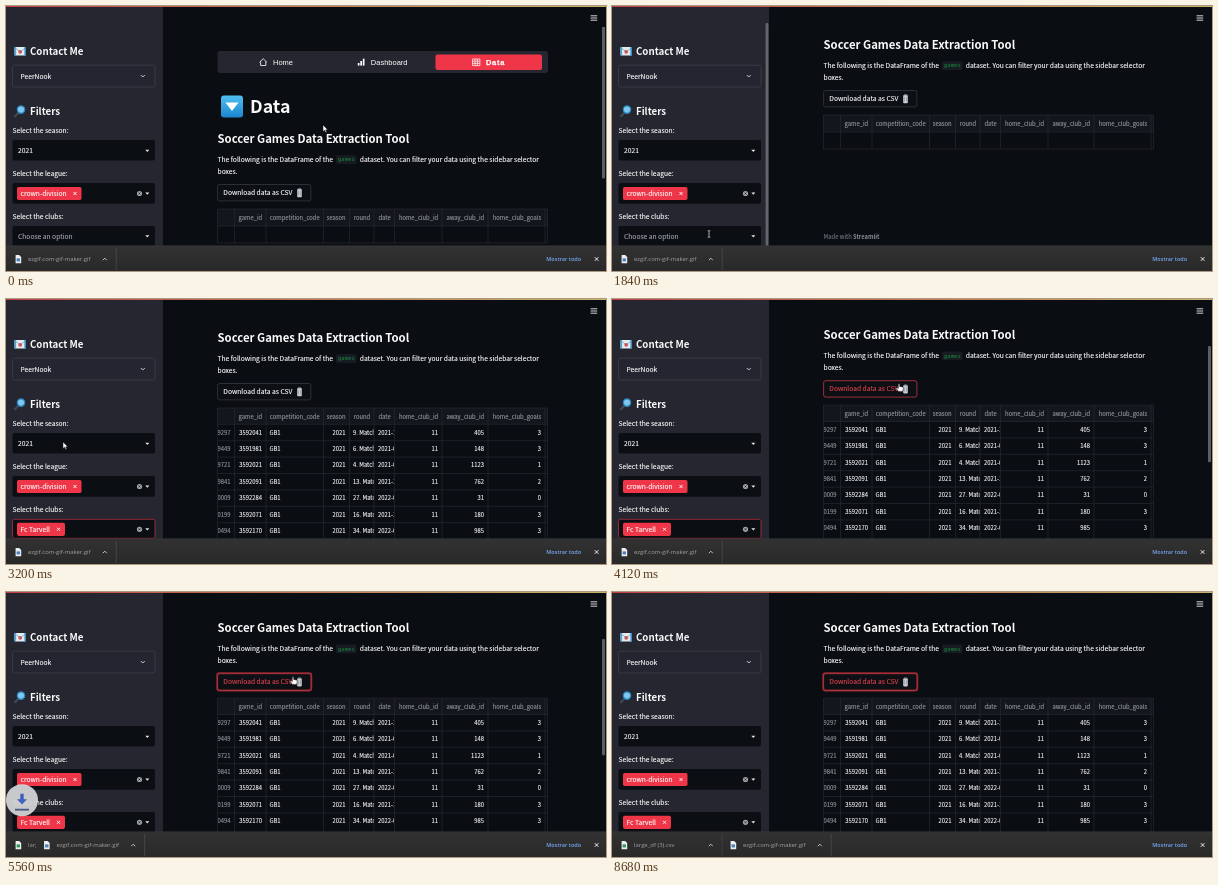
Recreate the animation shown at these times as an HTML page. Size 600 by 265 pixels, loop 8720 ms.

```html
<!DOCTYPE html>
<html lang="en">
<head>
<meta charset="utf-8">
<title>Data extraction dashboard</title>
<style>
  html, body { margin: 0; width: 100%; height: 100%; overflow: hidden; background: #0a0d12; }
  svg { display: block; width: 600px; height: 265px; }
  text { white-space: pre; }
  .sans { font-family: "Noto Sans CJK JP", "Noto Sans CJK SC", "Noto Sans CJK", "Open Sans", sans-serif; }
  .ui { font-family: "Open Sans", "Noto Sans", sans-serif; }
  .nav { font-family: "Liberation Sans", Arial, sans-serif; }
  .mono { font-family: "Noto Sans Mono", "DejaVu Sans Mono", monospace; }
  #button { --ink: #fafafa; --edge: #3b3e44; --ring: none; }
  #button.hover { --ink: #d8404b; --edge: #d8404b; }
  #button.focus { --ring: rgba(225, 50, 65, .65); }
  #button text { fill: var(--ink); stroke: var(--ink); }
  #edge { fill: #0c0f14; stroke: var(--edge); stroke-width: .7; }
  #ring { fill: none; stroke: var(--ring); stroke-width: 1.5; }
</style>
</head>
<body>
<svg id="stage" viewBox="0 0 600 265" xmlns="http://www.w3.org/2000/svg"></svg>
<script>
const LOOP = 8720;
const RED = '#ef3648', DARK = '#0b0e13', PANEL = '#252630', GRID = '#262930';

// ---- drawing helpers ----
const rect = (x, y, w, h, fill, extra = '') =>
  `<rect x="${x}" y="${y}" width="${w}" height="${h}" fill="${fill}" ${extra}/>`;
const path = (d, stroke, width = .8, extra = '') =>
  `<path d="${d}" fill="none" stroke="${stroke}" stroke-width="${width}" ${extra}/>`;
const shape = (d, fill, extra = '') => `<path d="${d}" fill="${fill}" ${extra}/>`;
const group = (id, body, extra = '') => `<g id="${id}" ${extra}>${body}</g>`;
const label = (cls, x, y, str, size, fill, extra = '') =>
  `<text class="${cls}" x="${x}" y="${y}" font-size="${size}" fill="${fill}" ${extra}>${str}</text>`;

// y is the middle of the capitals; the CJK face draws its Latin larger than nominal
const text = (x, y, str, size = 7.48, fill = '#fafafa', extra = '') =>
  label('sans', x, (y + size * .33).toFixed(2), str, (size / 1.117).toFixed(2), fill,
    `stroke="${fill}" stroke-width=".14" ${extra}`);
const bold = (x, y, str, size) =>
  label('sans', x, (y + size * .33).toFixed(2), str, (size / 1.155).toFixed(2), '#fafafa', 'font-weight="700"');
const END = 'text-anchor="end"';

const cross = (x, y, r, color, w = .9) =>
  path(`M${x - r} ${y - r}l${2 * r} ${2 * r}m0 ${-2 * r}l${-2 * r} ${2 * r}`, color, w);
const caret = (x, y) => shape(`M${x - 2} ${y - 1}h4l-2 2.2z`, '#e8e8ea');
const chevron = (x, y, up) =>
  path(`M${x - 2} ${y + (up ? 1 : -1)}l2 ${up ? -2 : 2}l2 ${up ? 2 : -2}`, '#d5d5d8', .9);
const clear = y => `<circle cx="133.5" cy="${y}" r="2.6" fill="#a0a2a8"/>` + cross(133.5, y, .9, DARK, .7);
const box = (y, h, stroke = 'none') =>
  rect(6.5, y, 142.5, h, DARK, `rx="2" stroke="${stroke}" stroke-width=".8"`);
const tag = (y, w, str) =>
  rect(11, y - 6.6, w, 13.2, RED, 'rx="1.8"') + text(14.5, y, str) + cross(11 + w - 6.5, y, 1.5, '#fff');

// ---- main column ----
const cols = [228.5, 260, 317.5, 343.5, 368, 388.5, 436, 482, 539];
const heads = ['game_id', 'competition_code', 'season', 'round', 'date',
  'home_club_id', 'away_club_id', 'home_club_goals'];
const games = [
  ['19297', 3592041, 2021, '9. Matchday', '2021-10', 405, 3],
  ['19449', 3591981, 2021, '6. Matchday', '2021-09', 148, 3],
  ['19721', 3592021, 2021, '4. Matchday', '2021-09', 1123, 1],
  ['19841', 3592091, 2021, '13. Matchday', '2021-11', 762, 2],
  ['20009', 3592284, 2021, '27. Matchday', '2022-03', 31, 0],
  ['20199', 3592071, 2021, '16. Matchday', '2021-12', 180, 3],
  ['20494', 3592170, 2021, '34. Matchday', '2022-04', 985, 3]
];
const CELL = 6.54;

function grid(top, rows, bottom) {
  const lines = cols.map(x => `M${x} ${top}V${bottom}`).join('') +
    rows.map(y => `M211.5 ${y}H541.5`).join('');
  return rect(211.5, top, 330, rows[0] - top, '#13161c') +
    path(`M211.5 ${top}H541.5V${bottom}H211.5z` + lines, GRID, .7);
}
const headRow = y => heads.map((h, i) =>
  text(cols[i + 1] - 3.8, y, h, CELL, '#8f929a', END)).join('');

function gameRow([index, id, season, round, date, away, goals], i) {
  const y = 227.5 + i * 16.4, ink = '#f0f1f3';
  const right = (c, v) => text(cols[c] - 4, y, v, CELL, ink, END);
  return `<g clip-path="url(#cIndex)">${text(224.5, y, index, CELL, '#8f929a', END)}</g>` +
    right(1, id) + text(263.5, y, 'GB1', CELL, ink) + right(3, season) +
    `<g clip-path="url(#cRound)">${text(347, y, round, CELL, ink)}</g>` +
    `<g clip-path="url(#cDate)">${text(372, y, date, CELL, ink)}</g>` +
    right(6, 11) + right(7, away) + right(8, goals);
}

const emptyTable = grid(203, [220], 237) + headRow(211.5) +
  text(211.5, 324.5, 'Made with', CELL, '#6c6f76') +
  label('sans', 241, 326.7, 'Streamlit', 5.75, '#8d9096', 'font-weight="700"');
const fullTable = grid(203, games.map((_, i) => 219.3 + i * 16.4), 345) +
  headRow(211.5) + games.map(gameRow).join('');

const navBar = rect(211.5, 45, 330.5, 22, PANEL, 'rx="3"') +
  rect(429.5, 48.5, 106.5, 15.5, RED, 'rx="2"') +
  path('M253.5 56.3l3.7-3.6l3.7 3.6M254.6 55.5v4h5.2v-4', '#fff', .8) +
  rect(351.8, 57, 1.7, 2.6, '#fff') + rect(354.3, 55, 1.7, 4.6, '#fff') + rect(356.8, 52.7, 1.7, 6.9, '#fff') +
  path('M466.5 53h7.4v6.6h-7.4zM466.5 55.2h7.4M466.5 57.4h7.4M469 53v6.6M471.4 53v6.6', '#fff', .7) +
  label('nav', 267, 58.8, 'Home', 7.5, '#fff') +
  label('nav', 364.8, 58.8, 'Dashboard', 7.5, '#fff') +
  label('nav', 480, 58.8, 'Data', 7.5, '#fff', 'font-weight="700" letter-spacing=".7" stroke="#fff" stroke-width=".25"');

const button = rect(211, 177.9, 94.5, 17.6, 'none', 'id="ring" rx="2.4"') +
  rect(211.6, 178.5, 93.3, 16.4, 'none', 'id="edge" rx="2"') +
  text(217.3, 186.8, 'Download data as CSV') +
  rect(291.2, 183, 4.6, 8.2, '#c9ccd2', 'rx=".8"') + rect(292.2, 182.2, 2.6, 1.3, '#888c95') +
  path('M292.5 185v4.4M294.5 185v4.4', '#81858e', .5);

const main = navBar +
  rect(215, 89.5, 22, 22, 'url(#blue)', 'rx="3"') + shape('M219.5 96.5h13l-6.5 8.6z', '#fff') +
  bold(244, 100.5, 'Data', 20.55) +
  bold(211.5, 132.4, 'Soccer Games Data Extraction Tool', 13.1) +
  text(211.5, 153.3, 'The following is the DataFrame of the') +
  rect(330, 149.3, 20.5, 8.8, '#171c22', 'rx="1.5"') +
  label('mono', 332, 155.4, 'games', 5.6, '#178a3f') +
  text(353.8, 153.3, 'dataset. You can filter your data using the sidebar selector') +
  text(211.5, 165.3, 'boxes.') +
  group('button', button) + group('empty', emptyTable) + group('full', fullTable);

const header = rect(157, 0, 443, 21, '#0a0d12') +
  group('running', text(518, 12, 'RUNNING...', 5.6, '#a5a8ae') +
    rect(553, 7, 17.5, 10, 'none', 'rx="2" stroke="#3b3e44" stroke-width=".7"') + text(556, 12, 'Stop', 5.6)) +
  path('M584.6 9.8h6.6M584.6 12h6.6M584.6 14.2h6.6', '#e8e8ea', .9);

// ---- sidebar ----
const mailIcon = rect(8.5, 41, 11.5, 8.6, '#e3ebf0', 'rx="1"') +
  path('M8.8 41.5l5.5 4.4l5.5-4.4', '#7fb2cf', .9) +
  rect(8.5, 41, 1.6, 8.6, '#4fa3d0') + rect(18.4, 41, 1.6, 8.6, '#3a8fc6') +
  '<circle cx="14.2" cy="45.8" r="1.9" fill="#c8575c"/>';
const lensIcon = path('M12.6 106.4l-3.6 3.8', '#3c4b58', 2.2, 'stroke-linecap="round"') +
  '<circle cx="15" cy="103.6" r="3.7" fill="#7cc8f0" stroke="#2c86bd" stroke-width="1.3"/>';

const sidebar = rect(0, 0, 157, 240, PANEL) +
  group('sideBar', rect(153.6, 17, 2.8, 223, '#65666d', 'rx="1.2"')) +
  mailIcon + bold(24, 45, 'Contact Me', 11.2) +
  rect(6.5, 59.2, 142.5, 21.8, '#242530', 'rx="2" stroke="#41434d" stroke-width=".7"') +
  text(14.5, 70.2, 'PeerNook') + chevron(136.8, 70) +
  lensIcon + bold(24, 105, 'Filters', 11.2) +
  text(6.5, 125, 'Select the season:') + box(134, 20.5) + text(12, 144.5, '2021') + caret(141.3, 144.7) +
  text(6.5, 168, 'Select the league:') + box(177, 20.8) + tag(187.5, 64.5, 'crown-division') +
  clear(187.5) + caret(141.3, 187.6) +
  text(6.5, 211, 'Select the clubs:') + box(220, 20.5) +
  group('clubEdge', box(220.3, 19, '#b83240')) +
  group('choose', text(12, 230.2, 'Choose an option', 7.48, '#a0a2a9')) +
  group('picked', tag(230.3, 48, 'Fc Tarvell') + clear(230.3)) + caret(141.3, 230.3);

const ROW = 18.7, MENU_TOP = 79.5;
const clubs = ['Marlow Dene', 'Saltmere Amp Cove Rovers', 'Amberly Towers', 'Fc Tarvell',
  'Fc Haldwick', 'Fc Pelmere', 'Fc Dunmoss', 'Fc Tolbury'];
const menu = rect(6.5, MENU_TOP, 142.5, 140.5, DARK) +
  rect(6.5, 0, 139.5, ROW, PANEL, 'id="hoverRow"') +
  clubs.map((c, i) => text(14, 89.3 + i * ROW, c)).join('') +
  rect(146, 80, 2.8, 52, '#6a6b71');

// ---- download shelf ----
const fileIcon = color => shape('M9.6 249h3.6l2 2v6.2h-5.6z', '#eceef0') + rect(10.6, 252.4, 3.4, 3, color);
const shelfItem = (name, color) => fileIcon(color) + label('ui', 22, 255.3, name, 5.92, '#a2a2a2') +
  chevron(98.8, 253.2, true) + path('M110.2 242v22', '#565656', .6);
const shelf = rect(0, 239.6, 600, 25.4, 'url(#shelfFill)') + path('M0 239.8H600', '#3d3d3d', .4) +
  `<g clip-path="url(#cNew)">${shelfItem('large_df (3).csv', '#2f9a57')}</g>` +
  group('oldItem', shelfItem('ezgif.com-gif-maker.gif', '#4a7fc0')) +
  label('ui', 540.3, 255.2, 'Mostrar todo', 5.5, '#77a8f4', 'font-weight="600"') +
  cross(590.6, 253, 1.8, '#f0f0f0', 1);

const badge = '<circle cx="16" cy="0" r="16" fill="#d2d2d4"/>' +
  shape('M14.3-6.5h3.4v5.5h3.3l-5 5.2l-5-5.2h3.3z', '#3f62c4') + rect(9, 8.6, 14, 1.8, '#4a5a86');

// ---- pointers, hot spot at 0,0 ----
const OUTLINE = 'stroke="#111" stroke-width=".5" stroke-linejoin="round"';
const pointers =
  group('arrow', shape('M0 0v6.6l1.6-1.4l1.1 2.4l1.1-.5l-1.1-2.3h2.1z', '#fff', OUTLINE)) +
  group('hand', shape('M-.7-2.4q.7-.9 1.4 0v2.3l2.7.6q1 .3.9 1.3l-.6 3.1h-4.2l-2.4-3q.3-1.2 1.4-.4l.8.6z', '#fff', OUTLINE)) +
  group('beam', path('M-1.3-3.3q1 0 1.3.5q.3-.5 1.3-.5M0-2.9v5.8M-1.3 3.3q1 0 1.3-.5q.3.5 1.3.5', '#f2f2f2', .7));

const clip = (id, x, y, w, h, rid = '') =>
  `<clipPath id="${id}"><rect ${rid} x="${x}" y="${y}" width="${w}" height="${h}"/></clipPath>`;
const gradient = (id, dir, a, b) =>
  `<linearGradient id="${id}" ${dir}><stop stop-color="${a}"/><stop offset="1" stop-color="${b}"/></linearGradient>`;
const DOWN = 'x2="0" y2="1"';

const $ = id => document.getElementById(id);
$('stage').innerHTML = '<defs>' +
  gradient('blue', DOWN, '#4fc0f0', '#1c86cf') + gradient('shelfFill', DOWN, '#323232', '#292929') +
  gradient('topLine', '', '#e0464a', '#e8d27a') +
  clip('cIndex', 212, 200, 16, 160) + clip('cRound', 344, 200, 23.7, 160) + clip('cDate', 369, 200, 19, 160) +
  clip('cMenu', 6.5, MENU_TOP, 142.5, 140.4) + clip('cNew', 0, 240, 0, 25, 'id="newClip"') + '</defs>' +
  rect(0, 0, 600, 265, '#0a0d12') + group('main', main) +
  rect(596, 0, 3, 10, '#5c5e63', 'id="thumb" rx="1"') + header + sidebar +
  group('menu', menu, 'clip-path="url(#cMenu)"') +
  rect(0, 0, 600, 1, 'url(#topLine)', 'opacity=".85"') +
  group('blank', rect(0, 0, 600, 240, '#000')) + shelf + group('badge', badge) + group('pointer', pointers);

// ---- timeline ----
const FOCUS = 4560;
const spans = {
  arrow: [[0, 1480], [2760, 3900], [4880, 5320], [7080, LOOP]],
  beam: [[1480, 1960]],
  hand: [[1960, 2760], [3900, 4880], [5320, 7080]],
  sideBar: [[1320, 1880]],
  menu: [[1880, 2720]],
  clubEdge: [[1880, FOCUS]],
  choose: [[0, 2720]],
  picked: [[2720, LOOP]],
  running: [[2760, 3160]],
  empty: [[0, 3160]],
  full: [[3160, LOOP]],
  blank: [[4880, 5320]],
  badge: [[5240, 5792]]
};
const pointerKeys = [[0, 317, 119], [960, 317, 119], [1600, 97, 228], [1960, 97, 228], [2440, 57, 143],
  [3240, 57, 143], [4000, 287, 87.5], [7040, 287, 87.5], [7760, 62, 254], [8240, 62, 254], [8600, 62, 270]];

const ease = p => p * p * (3 - 2 * p);
const progress = (t, a, b) => Math.min(1, Math.max(0, (t - a) / (b - a)));

function pointerAt(t) {
  const n = pointerKeys.findIndex(k => k[0] > t);
  if (n < 0) return pointerKeys[pointerKeys.length - 1].slice(1);
  const [t0, x0, y0] = pointerKeys[n - 1], [t1, x1, y1] = pointerKeys[n];
  const p = ease(progress(t, t0, t1));
  return [x0 + (x1 - x0) * p, y0 + (y1 - y0) * p];
}
const move = (id, x, y) => $(id).setAttribute('transform', `translate(${x.toFixed(2)} ${y.toFixed(2)})`);
const set = (id, name, value) => $(id).setAttribute(name, value);

function draw(t) {
  for (const id in spans)
    $(id).style.display = spans[id].some(([a, b]) => t >= a && t < b) ? '' : 'none';

  const [x, y] = pointerAt(t);
  move('pointer', x, y);
  const row = Math.floor((y - MENU_TOP) / ROW);
  set('hoverRow', 'y', MENU_TOP + row * ROW - .2);
  set('hoverRow', 'opacity', y < 218 ? 1 : 0);

  // the scrollbar shows only while the pointer is over the main column
  const scroll = 94 * ease(progress(t, 200, 1080)) + (t >= 3560 ? 2.8 : 0);
  move('main', 0, -scroll);
  const height = t < 3160 ? 334 : 495;
  set('thumb', 'y', scroll * 240 / height);
  set('thumb', 'height', 240 * 240 / height);
  set('thumb', 'opacity', x > 157 && y < 240 ? 1 : 0);

  const top = 178 - scroll;
  const over = x > 211 && x < 305 && y > top && y < top + 17;
  const focus = t >= FOCUS;
  set('button', 'class', (over || focus ? 'hover ' : '') + (focus ? 'focus' : ''));

  // the badge sinks to the shelf while fading in and out
  const v = .08 + .92 * progress(t, 5240, 5792);
  move('badge', 0, 188.5 + 32 * v);
  set('badge', 'opacity', Math.max(0, 1 - 4 * (v - .5) ** 2));

  const slide = 109 * ease(progress(t, 5320, 6040));
  move('oldItem', slide, 0);
  set('newClip', 'width', slide ? slide + 1.6 : 0);
}

const start = performance.now();
function tick() {
  draw((performance.now() - start) % LOOP);
  requestAnimationFrame(tick);
}
tick();
</script>
</body>
</html>
```
